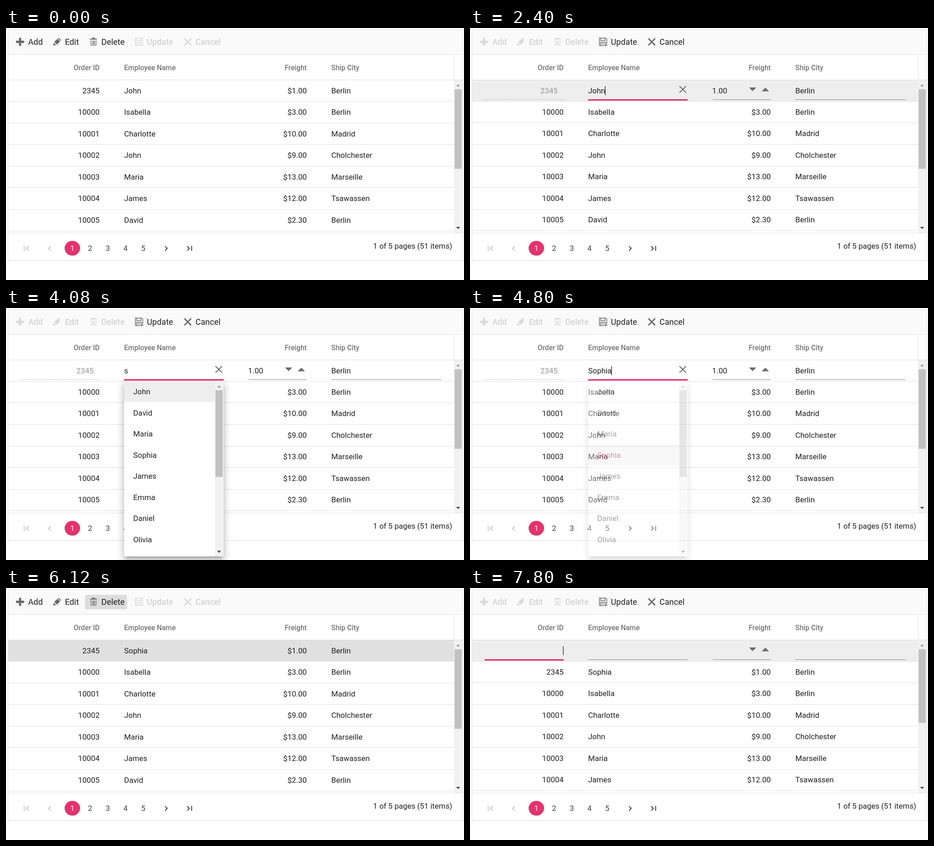
Animation of 1008 by 555 pixels, one loop 8 s. Source, as an HTML page:

```html
<!DOCTYPE html>
<html lang="en">
<head>
<meta charset="utf-8">
<title>Editable order grid</title>
<style>
html, body { margin: 0; width: 100%; height: 100%; overflow: hidden; background: #fff; }
#stage { position: relative; width: 1008px; height: 555px; overflow: hidden; }
svg { display: block; }
text { font: 16.9px Roboto, sans-serif; fill: #212121; white-space: pre; }
.head { font-size: 15.6px; font-weight: 500; fill: #757575; }
.tool { font-size: 18.2px; }
.end { text-anchor: end; }
.mid { text-anchor: middle; }
.dark text { fill: #000; }
.off { opacity: .22; }
.faded { fill: #959595; }
.page { fill: #424242; }
.white { fill: #fff; }
.pink { fill: #e3165b; }
.icon { fill: #6b6b6b; }
.stroke { fill: none; stroke: #6b6b6b; stroke-width: 1.7; }
#popup {
  position: absolute; left: 260px; top: 161px; width: 219px; height: 386px; background: #fff;
  box-shadow: 0 6.5px 6.5px -4px rgba(0,0,0,.2), 0 10px 13px 1px rgba(0,0,0,.14), 0 4px 18px 2.6px rgba(0,0,0,.12);
}
</style>
</head>
<body>
<div id="stage">
  <svg id="grid" width="1008" height="555"></svg>
  <div id="popup"><svg id="list" width="219" height="386" viewBox="260 161 219 386"></svg></div>
</div>
<script>
const LOOP = 8000;
const EDIT = 2040, SAVE = 5580, ADD = 6720;
const VIEWING = `0-${EDIT} ${SAVE}-${ADD}`;
const EDITING = `${EDIT}-${SAVE}`;
const ADDING = `${ADD}-${LOOP}`;
const FORM = `${EDITING} ${ADDING}`;
const LINE = '#e0e0e0';

const text = (x, y, s, cls = '') => `<text x="${x}" y="${y}" class="${cls}">${s}</text>`;
const rect = (x, y, w, h, fill, extra = '') =>
  `<rect x="${x}" y="${y}" width="${w}" height="${h}" fill="${fill}" ${extra}/>`;
const path = (d, cls, extra = '') => `<path d="${d}" class="${cls}" ${extra}/>`;
const on = (times, body) => `<g data-on="${times}">${body}</g>`;
const triangle = (x, y, half, h, fill) =>
  `<path d="M${x - half} ${y - h / 2}h${2 * half}l${-half} ${h}z" fill="${fill}"/>`;

const orders = [
  ['10000', 'Isabella', '$3.00', 'Berlin'],
  ['10001', 'Charlotte', '$10.00', 'Madrid'],
  ['10002', 'John', '$9.00', 'Cholchester'],
  ['10003', 'Maria', '$13.00', 'Marseille'],
  ['10004', 'James', '$12.00', 'Tsawassen'],
  ['10005', 'David', '$2.30', 'Berlin']
];
const first = name => ['2345', name, '$1.00', 'Berlin'];

function row([id, name, freight, city], i, shift = 0) {
  const y = Math.round(143.9 + shift + 47.5 * i);
  return text(206, y, id, 'end') + text(260, y, name) +
    text(662, y, freight, 'end') + text(716, y, city);
}
const rows = (list, start, shift) => list.map((r, i) => row(r, i + start, shift)).join('');
const rowLines = (base, step) =>
  Array.from({ length: 7 }, (_, i) => rect(5, Math.round(base + step * i), 981, 1, LINE)).join('');

// Toolbar
const icons = {
  Add: path('M28.5 21.5h5v6.5h6.5v5h-6.5v6.5h-5v-6.5h-6.5v-5h6.5z', 'icon'),
  Edit: path('M106.3 30.6l6.8-6.8 6 6-6.8 6.8zM105.2 32.2l5.4 5.4-6.6 1zM114.2 22.7l1.6-1.4 5.6 5.4-1.4 1.7z', 'icon'),
  Delete: path('M185 23.5h15v2h-15zM189.5 21.3h6v2.4h-6z', 'icon') +
    path('M187 26.5v11.7h11.2v-11.7M190.6 28v8.5M192.7 28v8.5M194.8 28v8.5', 'stroke', 'style="stroke-width:1.3"'),
  Update: path('M284.8 22.3h14l2.2 2.2v14.2h-16.2zM288 22.5v5.7h9.2v-5.7M287.5 38.5v-6.8h10.6v6.8M290 35h5.5', 'stroke',
    'style="stroke-width:1.5"'),
  Cancel: path('M392.5 23l15 15.2M407.5 23l-15 15.2', 'stroke', 'style="stroke-width:3"')
};
const labelX = { Add: 48.7, Edit: 129.7, Delete: 209.8, Update: 310, Cancel: 416.9 };
const tools = (names, cls) => `<g class="${cls}">` +
  names.map(n => icons[n] + text(labelX[n], 37, n, 'tool')).join('') + '</g>';
const normal = ['Add', 'Edit', 'Delete'], editing = ['Update', 'Cancel'];
const glow = (x, w, times, fill = '#dcdcdc') => on(times, rect(x, 15, w, 32, fill, 'rx="2.6"'));

const toolbar = rect(5, 4, 1001, 55, '#fafafa') +
  glow(94, 72, '1560-1920 6180-6300') + glow(94, 72, '1920-2040', '#bdbdbd') +
  glow(275, 98, '5220-5520') + glow(275, 98, '5520-5580', '#bdbdbd') +
  glow(174, 92, '6120-6180') +
  glow(13, 77, '6300-6660') + glow(13, 77, '6660-6720', '#bdbdbd') +
  on(VIEWING, tools(normal, '') + tools(editing, 'off')) +
  on(FORM, tools(normal, 'off') + tools(editing, ''));

const header = text(206, 92.5, 'Order ID', 'head end') + text(260, 92.5, 'Employee Name', 'head') +
  text(662, 92.5, 'Freight', 'head end') + text(716, 92.5, 'Ship City', 'head');

// Rows and the inline form
const body =
  on('1920-2040 5580-6720', rect(5, 115, 981, 47, '#e0e0e0')) +
  on('2400-4080 4980-5040 7320-8000', rect(5, 115, 981, 46, '#eeeeee')) +
  on(VIEWING, rowLines(161, 47.6) + rows(orders, 1)) +
  on(FORM, rowLines(160.8, 47.6)) +
  on('0-780 1200-2040', row(first('John'), 0)) +
  on('780-1200', `<g class="dark">${row(first('John'), 0)}</g>`) +
  on(`${SAVE}-${ADD}`, row(first('Sophia'), 0)) +
  on(EDITING, rows(orders, 1, -.6)) +
  on(ADDING, rows([first('Sophia'), ...orders.slice(0, 5)], 1, -.6));

const underline = (x, w) => rect(x, 157, w, 1.2, '#949494');
const caret = (x, times) => on(times, rect(x, 128, 1.2, 20, '#111'));
const form =
  on(FORM, underline(260, 219) + underline(534, 128) + underline(716, 242) +
    triangle(622, 135, 8, 8, '#6b6b6b') + triangle(650, 135.5, 8, -8, '#6b6b6b')) +
  on(EDITING, text(193, 144, '2345', 'end faded') + text(533, 144, '1.00') + text(716, 144, 'Berlin') +
    path('M32 157.5h174', 'stroke', 'style="stroke:#999;stroke-width:1.2;stroke-dasharray:1.6 2.4"') +
    '<rect id="nameBar" y="157" height="2.7" class="pink"/>') +
  on(ADDING, underline(32, 174) + '<rect id="idBar" y="157" height="2.7" class="pink"/>') +
  on('2040-2940', text(260, 144, 'John')) +
  on('3540-4680', text(260, 144, 's')) +
  on('4680-5580', text(260, 144, 'Sophia')) +
  on('2040-2940 3540-5580', path('M461 128l14.5 14.5M475.5 128l-14.5 14.5', 'stroke', 'style="stroke-width:2"')) +
  caret(297, '2040-2580') + caret(260, '3120-3540') + caret(269, '3540-4080') +
  caret(311, '4680-5340') + caret(204.6, '6720-7320 7800-8000');

const scrollbar = rect(986, 115, 19, 336, '#f1f1f1') +
  triangle(995, 126, 4.5, -5, '#a3a3a3') + triangle(995, 440.5, 4.5, 5, '#505050') +
  on(`0-${ADD}`, rect(987.3, 135, 15.7, 175, '#c1c1c1')) +
  on(ADDING, rect(987.3, 135, 15.7, 162, '#c1c1c1'));

// Pager
const arrow = (d, color) => path(d, 'stroke', `style="stroke:${color}"`);
const pager = '<ellipse cx="146" cy="485" rx="17" ry="16.2" fill="#e8316d"/>' +
  text(146, 491, '1', 'mid white') +
  [2, 3, 4, 5].map(n => text(185 + 39 * (n - 2), 491, n, 'mid page')).join('') +
  arrow('M40.2 480v10.6M50 480.5l-4.8 4.8 4.8 4.8M98.5 480.5l-4.8 4.8 4.8 4.8', '#bdbdbd') +
  arrow('M350 480.5l4.8 4.8-4.8 4.8M398.8 480.5l4.8 4.8-4.8 4.8M408.6 480v10.6', '#212121') +
  text(982, 486, '1 of 5 pages (51 items)', 'end');

const frame = rect(4.5, 3.5, 1001, 509, 'none', `stroke="${LINE}"`) +
  rect(5, 58, 1001, 1, LINE) + rect(5, 114, 1001, 1, LINE) +
  rect(986, 59, 1, 56, LINE) + rect(5, 451, 1001, 1, LINE);

document.getElementById('grid').innerHTML =
  toolbar + header + frame + body + form + scrollbar + pager;

// Suggestion list
const PITCH = 46.57;
const names = ['John', 'David', 'Maria', 'Sophia', 'James', 'Emma', 'Daniel', 'Olivia'];
const item = (n, i, cls) => text(280, Math.round(190 + PITCH * i), n, cls);
document.getElementById('list').innerHTML =
  rect(260, 161, 200, 46, '#eeeeee', 'id="hover"') +
  names.map((n, i) => item(n, i)).join('') +
  on('4560-4980', item('Sophia', 3, 'pink')) +
  rect(460, 161, 19, 386, '#f1f1f1') + rect(461, 181, 16, 191, '#c1c1c1') +
  triangle(469, 172.5, 4.5, -5, '#a3a3a3') + triangle(469, 537, 4.5, 5, '#505050');

const timed = [...document.querySelectorAll('[data-on]')].map(el => ({
  el, spans: el.dataset.on.split(' ').map(s => s.split('-').map(Number))
}));
const [popup, hover, nameBar, idBar] =
  ['popup', 'hover', 'nameBar', 'idBar'].map(id => document.getElementById(id));

const progress = (t, from, to) => Math.min(1, Math.max(0, (t - from) / (to - from)));

// The focus line opens outwards from its centre.
function openBar(bar, center, width, p) {
  const w = width * (1 - (1 - p) ** 2);
  bar.setAttribute('x', center - w / 2);
  bar.setAttribute('width', w);
}

function draw(t) {
  for (const { el, spans } of timed)
    el.style.display = spans.some(([a, b]) => t >= a && t < b) ? '' : 'none';

  openBar(nameBar, 369.5, 219, progress(t, EDIT, 2220));
  openBar(idBar, 119, 174, progress(t, ADD, 7020));

  const alpha = progress(t, 3540, 3780) * (1 - progress(t, 4620, 4920));
  popup.style.opacity = alpha;
  popup.style.display = alpha ? '' : 'none';

  const index = [4080, 4140, 4200, 4320].filter(start => t >= start).length - 1;
  hover.style.display = index < 0 ? 'none' : '';
  hover.setAttribute('y', 161 + PITCH * Math.max(0, index));
}

const begin = performance.now();
function tick() {
  draw((performance.now() - begin) % LOOP);
  requestAnimationFrame(tick);
}
tick();
</script>
</body>
</html>
```
